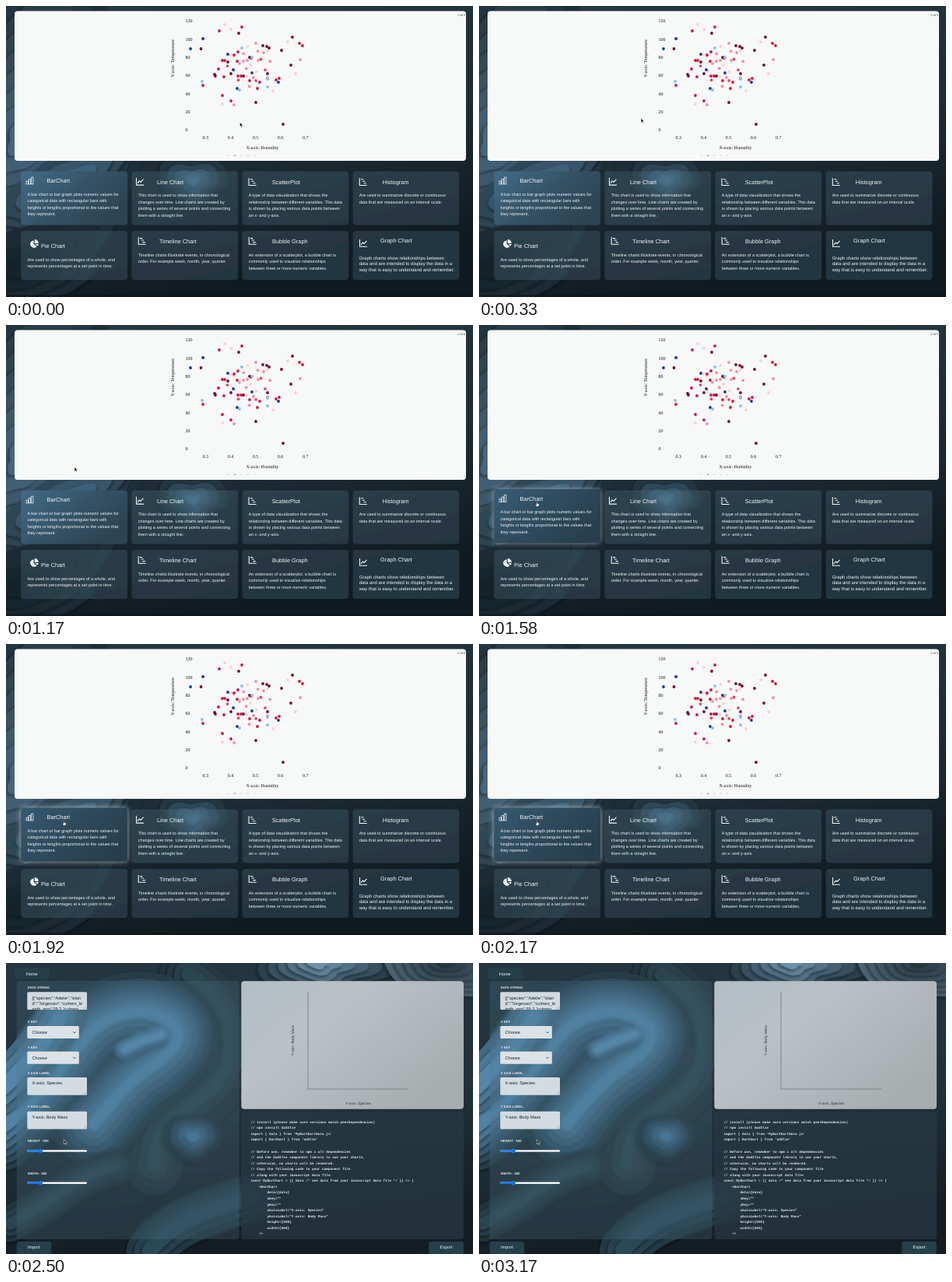
Write an HTML page that moves like this. It is 600 px wide and 374 px high and loops after 3.33 s.

```html
<!DOCTYPE html>
<html lang="en">
<head>
<meta charset="utf-8">
<style>
html, body { margin: 0; width: 100%; height: 100%; overflow: hidden; background: #16232b; }
svg { display: block; width: 100vw; height: 100vh; }
text { font-family: "Liberation Sans", Arial, sans-serif; white-space: pre; text-rendering: geometricPrecision; }
.serif { font-family: "Liberation Serif", Times, serif; font-size: 6px; fill: #111; }
.mono { font-family: "Liberation Mono", "Courier New", monospace; font-size: 4.36px; font-weight: bold; fill: #e6ebee; }
.title { font-size: 7.4px; fill: #f2f6f8; }
.body { font-size: 5.48px; fill: #f2f6f8; }
.label { font-size: 4.25px; font-weight: bold; fill: #e3eaee; }
.field { font-size: 5.6px; fill: #17222a; }
.button { font-size: 5.6px; fill: #f2f6f8; text-anchor: middle; }
.axis { font-size: 4.8px; fill: #33393d; text-anchor: middle; }
.icon { fill: none; stroke: #f2f6f8; stroke-width: 1.1; stroke-linejoin: round; }
.ridge { fill: none; stroke-linecap: round; stroke-linejoin: round; }
</style>
</head>
<body>
<svg id="stage" viewBox="0 0 600 374" preserveAspectRatio="none"></svg>
<script>
const stage = document.getElementById('stage');
const TAU = Math.PI * 2;

const text = (x, y, cls, str, extra = '') =>
  `<text x="${x}" y="${y}" class="${cls}" ${extra}>${str.replace(/&/g, '&amp;').replace(/</g, '&lt;')}</text>`;
const rect = (x, y, w, h, fill, r = 0, extra = '') =>
  `<rect x="${x}" y="${y}" width="${w}" height="${h}" rx="${r}" fill="${fill}" ${extra}/>`;
const lines = (x, y, step, cls, rows, extra) =>
  rows.map((row, i) => text(x, y + i * step, cls, row, extra)).join('');
const blend = (from, to, k, steps) =>
  `color-mix(in srgb, ${to} ${Math.round(100 * k / Math.max(1, steps - 1))}%, ${from})`;

// Wavy paper-cut terraces, each one a smaller ring on top of the last.
function terraces({ x, y, rx, ry, tilt = 0, steps, from, to, wave = 0.12, seed = 0 }) {
  let out = '';
  for (let k = 0; k < steps; k++) {
    const size = 1 - k / steps;
    const points = Array.from({ length: 60 }, (_, i) => {
      const a = i / 60 * TAU;
      const r = size * (1 + wave * Math.sin(3 * a + seed + k * 0.2) + wave * 0.6 * Math.sin(5 * a - seed * 2));
      return `${(Math.cos(a) * r * rx).toFixed(1)},${(Math.sin(a) * r * ry).toFixed(1)}`;
    });
    out += `<polygon points="${points.join(' ')}" transform="translate(${x} ${y}) rotate(${tilt})"
      style="fill:${blend(from, to, k, steps)}" filter="url(#lift)"/>`;
  }
  return out;
}

// The same paper-cut look along a curved spine: ever narrower strokes.
const ridge = (d, width, steps, from, to) => Array.from({ length: steps }, (_, k) =>
  `<path class="ridge" d="${d}" stroke-width="${width * (1 - k / steps)}"
    style="stroke:${blend(from, to, k, steps)}" filter="url(#lift)"/>`).join('');

const defs = `<defs>
  <filter id="lift" filterUnits="userSpaceOnUse" x="-250" y="-250" width="1100" height="900">
    <feDropShadow dx="-1" dy="2" stdDeviation="2" flood-color="#060d12" flood-opacity=".6"/></filter>
  <filter id="frost" filterUnits="userSpaceOnUse" x="-20" y="-20" width="640" height="414"><feGaussianBlur stdDeviation="2.4"/></filter>
  <filter id="glow" x="-30%" y="-40%" width="160%" height="180%"><feGaussianBlur stdDeviation="3.5"/></filter>
  <linearGradient id="night" x2=".35" y2="1"><stop stop-color="#273943"/><stop offset=".6" stop-color="#1d2c35"/><stop offset="1" stop-color="#101a21"/></linearGradient>
  <linearGradient id="deep" x2=".2" y2="1"><stop stop-color="#243640"/><stop offset=".6" stop-color="#20313a"/><stop offset="1" stop-color="#141d23"/></linearGradient>
  <linearGradient id="first" x2="1" y2=".6"><stop stop-color="#426b86"/><stop offset=".55" stop-color="#355366"/><stop offset="1" stop-color="#2d4452"/></linearGradient>
  <linearGradient id="silver" x2="1" y2=".7"><stop stop-color="#b3bec5"/><stop offset=".4" stop-color="#bac1c5"/><stop offset="1" stop-color="#a7acaf"/></linearGradient>
</defs>`;

// Chart overview
const dots = {
  '#fbcfd1': [281, 24, 255, 42, 289, 30, 362, 46, 289, 63, 372, 87, 278, 126, 343, 109],
  '#f48fa0': [321, 48, 331, 60, 293, 127, 378, 69, 305, 71, 310, 70, 324, 70, 318, 92],
  '#cf1740': [274, 32, 303, 27, 377, 48, 381, 51, 278, 70, 281, 70, 273, 81, 280, 91, 253, 102, 298, 59,
    293, 63, 297, 71, 298, 90, 302, 90, 323, 106, 326, 98, 313, 96, 351, 93, 347, 95, 278, 115, 289, 122],
  '#750a2a': [299, 35, 250.5, 55, 330, 51, 335, 52, 368, 40, 354, 57, 285, 72, 268, 88, 269, 90, 289, 87,
    313, 66, 338, 54, 366, 76, 336, 87, 321, 124, 356, 152, 305, 90],
  '#123a94': [237, 55, 253, 42, 285, 62, 292, 82, 350, 98, 297, 106, 316, 86],
  '#83bdf0': [252, 97, 303, 54, 316, 66, 300, 108, 336, 104, 336, 94]
};
const dot = (x, y, fill) => `<circle cx="${x}" cy="${y}" r="1.9" fill="${fill}"/>`;

function scatter() {
  let out = '';
  const tints = ['#fbcfd1', '#f48fa0', '#e0476a'];
  for (let i = 0; i < 20; i++) {
    const a = i * 2.4, r = Math.sqrt(i / 20);
    out += dot(314 + 32 * r * Math.cos(a), 76 + 28 * r * Math.sin(a), tints[i % 3]);
  }
  for (const [fill, xy] of Object.entries(dots))
    for (let i = 0; i < xy.length; i += 2) out += dot(xy[i], xy[i + 1], fill);
  for (let i = 0; i <= 6; i++) out += text(230.5, 161.4 - i * 23.35, 'serif', String(i * 20));
  for (let i = 0; i < 5; i++) {
    out += text(256.3 + i * 32.1, 171.2, 'serif', `0.${i + 3}`, 'text-anchor="middle"');
    out += `<path d="M${284 + i * 8.4} 193h2.4v-2.4z" fill="${i === 1 ? '#999' : '#d6d9da'}"/>`;
  }
  return out + text(329.5, 183.6, 'serif', 'X-axis: Humidity', 'text-anchor="middle"')
    + text(0, 0, 'serif', 'Y-axis: Temperature', 'text-anchor="middle" transform="translate(216.3 67.5) rotate(-90)"')
    + text(590, 12.5, 'axis', '2 of 5', 'style="font-size:3.8px;text-anchor:end"');
}

const icons = {
  bars: '<path class="icon" d="M.5 9.5V5.5H3V9.5ZM3.7 9.5V3H6.2V9.5ZM6.9 9.5V.5H9.4V9.5Z" style="stroke-width:.8"/>',
  line: '<path class="icon" d="M.5 0V9.3H10M2 6.8L4.3 4L6 5.5L9.5 1.8"/>',
  plot: '<path class="icon" d="M.5 0V9.3H10M2.3 1.6H5.5M4 4H7.3M5.8 6.6H9"/>',
  pie: '<path fill="#f2f6f8" d="M4.8 1.2A4.8 4.8 0 1 0 8.7 9.2L4.8 6ZM6 0V5H11A5 5 0 0 0 6 0ZM6.5 6L9.6 8.6A5 5 0 0 0 11 6Z"/>'
};
const cards = [
  { icon: ['bars', 25.5, 219.5], title: ['BarChart', 52.5, 227.3], at: [27.5, 243.9], rows: [
    'A bar chart or bar graph plots numeric values for', 'categorical data with rectangular bars with',
    'heights or lengths proportional to the values that', 'they represent.'] },
  { icon: ['line', 167, 220.8], title: ['Line Chart', 194, 229], at: [169.7, 245.3], rows: [
    'This chart is used to show information that', 'changes over time. Line charts are created by',
    'plotting a series of several points and connecting', 'them with a striaght line.'] },
  { icon: ['plot', 311.5, 221.2], title: ['ScatterPlot', 341.7, 229], at: [311.7, 245.3], rows: [
    'A type of data visualization that shows the', 'relationship between different variables. This data',
    'is shown by placing various data points between', 'an x- and y-axis.'] },
  { icon: ['plot', 453.8, 221.2], title: ['Histogram', 483.8, 229], at: [453.7, 245.3], rows: [
    'Are used to summarize discrete or continuous', 'data that are measured on an interval scale.'] },
  { icon: ['pie', 30.8, 300], title: ['Pie Chart', 45, 310.8], at: [27.5, 328], rows: [
    'Are used to show percentages of a whole, and', 'represents percentages at a set point in time.'] },
  { icon: ['plot', 169.7, 297], title: ['Timeline Chart', 197, 304.6], at: [169.7, 322], rows: [
    'Timeline charts illustrate events, in chronological', 'order. For example week, month, year, quarter.'] },
  { icon: ['plot', 311.7, 297], title: ['Bubble Graph', 342, 304.6], at: [311.7, 322], rows: [
    'An extension of a scatterplot, a bubble chart is', 'commonly used to visualize relationships', 'between three or more numeric variables.'] },
  { icon: ['line', 454, 300], title: ['Graph Chart', 481, 304.4], at: [453.7, 325.8], size: 5.97, step: 7.6, rows: [
    'Graph charts show relationships between', 'data and are intended to display the data in a', 'way that is easy to understand and remember.'] }
];
const cardRect = (i, fill, extra) =>
  rect(19.3 + (i % 4) * 142.1, i < 4 ? 212.5 : 289, 136.7, i < 4 ? 69 : 63, fill, 4, extra);

function card(c, i) {
  const [icon, ix, iy] = c.icon, [title, tx, ty] = c.title;
  const content = `<g transform="translate(${ix} ${iy})">${icons[icon]}</g>` + text(tx, ty, 'title', title)
    + lines(...c.at, c.step || 8.4, 'body', c.rows, c.size ? `style="font-size:${c.size}px"` : '');
  if (i) return content;
  return `<g id="hovered"><g id="halo" opacity="0">${cardRect(0, '#dce3e6', 'filter="url(#glow)"')}</g>
    ${cardRect(0, 'url(#first)')}<g id="shade" opacity="0">${cardRect(0, '#1d3240')}</g>${content}</g>`;
}

const overviewLand = rect(0, 0, 600, 374, 'url(#night)')
  + terraces({ x: 20, y: 170, rx: 150, ry: 210, tilt: 25, steps: 9, from: '#1f2f39', to: '#46667d', seed: 1 })
  + terraces({ x: 75, y: 235, rx: 85, ry: 42, tilt: -32, steps: 4, from: '#2f4657', to: '#46718e', seed: 2 })
  + terraces({ x: 240, y: 224, rx: 44, ry: 30, steps: 4, from: '#22343f', to: '#426a84', seed: 3 })
  + terraces({ x: 20, y: 335, rx: 110, ry: 52, tilt: -18, steps: 4, from: '#1c2c35', to: '#16232b', seed: 4 });

const overview = `<g id="overview"><g id="land">${overviewLand}</g>
  <clipPath id="cardClip">${cards.map((_, i) => i ? cardRect(i, '#fff') : '').join('')}</clipPath>
  <g clip-path="url(#cardClip)"><use href="#land" filter="url(#frost)"/>${rect(0, 0, 600, 374, '#5b8399', 0, 'opacity=".25"')}</g>
  ${rect(0, 371, 600, 3, '#0c151b', 0, 'opacity=".6"')}
  ${rect(11, 6.5, 580, 192.5, '#f7f8f8', 4)}${scatter()}${cards.map(card).join('')}</g>`;

// Chart editor
const arch = 'M-10 215C30 185 60 150 95 105C120 70 165 52 205 72C240 92 210 118 185 135C158 152 140 175 112 208';
const editorLand = rect(0, 0, 600, 374, 'url(#deep)')
  + ridge('M235 15C300 55 300 130 262 165C225 195 190 205 190 260', 75, 4, '#22343d', '#2c444f')
  + ridge(arch, 105, 6, '#263d4a', '#4f83a6')
  + ridge('M-10 165C20 140 45 110 70 70', 60, 3, '#436b84', '#5286aa')
  + ridge('M152 112C172 100 185 98 200 92', 24, 2, '#47769a', '#568db2')
  + ridge('M5 335C60 310 85 275 140 262', 46, 3, '#22343e', '#2b4451')
  + terraces({ x: 240, y: 223, rx: 38, ry: 30, steps: 4, from: '#22363f', to: '#44769a', seed: 3, wave: 0.06 })
  + ridge('M185 370C215 330 260 320 320 300', 60, 3, '#243842', '#2c4857')
  + terraces({ x: 400, y: 0, rx: 88, ry: 40, tilt: 6, steps: 6, from: '#2b404c', to: '#6d91ab', seed: 2.4 })
  + terraces({ x: 565, y: -4, rx: 85, ry: 48, tilt: 12, steps: 7, from: '#4c6373', to: '#2a3b45', seed: 1, wave: 0.06 });

const field = (y, h, rows) => rect(27.3, y, 76.7, h, '#dce2e6', 1.5, 'fill-opacity=".95"')
  + `<clipPath id="clip${y}">${rect(27, y, 77, h)}</clipPath><g clip-path="url(#clip${y})">${lines(33.5, y + 9.4, 7, 'field', rows)}</g>`
  + `<path d="M100 ${y + h - 1}l3-3M101.7 ${y + h - 1}l1.3-1.3" stroke="#7b858b" stroke-width=".5"/>`;
const select = y => rect(27.3, y, 66.5, 16, '#dce2e6', 1.5) + text(33.5, y + 10, 'field', 'Choose')
  + `<path d="M86.3 ${y + 7.3}l1.7 1.7l1.7-1.7" fill="none" stroke="#26323a" stroke-width=".8"/>`;
const slider = y => rect(27.3, y - 1.3, 76.7, 2.6, '#eff1f2', 1.3) + rect(27.3, y - 1.3, 17, 2.6, '#1277f0', 1.3)
  + `<circle cx="44.3" cy="${y}" r="2.7" fill="#1277f0"/>`;
const button = (x, y, w, h, label) => rect(x, y, w, h, '#25404b', 3) + text(x + w / 2, y + 9.2, 'button', label);

const labels = { 'DATA STRING': 32.7, 'X KEY': 77, 'Y KEY': 109.6, 'X AXIS LABEL': 142.6,
  'Y AXIS LABEL': 186, 'HEIGHT - 500': 230.4, 'WIDTH - 500': 271.6 };
const code = [
  '// install (please make sure versions match peerDependencies)', '// npm install @ad3lie',
  "import { data } from 'MyBarChartData.js'", "import { BarChart } from 'ad3lie'", '',
  '// Before use, remember to npm i all dependencies', '// and the @ad3lie component library to use your charts,',
  '// otherwise, no charts will be rendered.', '// Copy the following code to your component file',
  '// along with your Javascript data file.',
  'const MyBarChart = ({ data /* see data from your Javascript data file */ }) => (',
  '    <BarChart', '        data={data}', '        xKey=""', '        yKey=""',
  '        xAxisLabel="X-axis: Species"', '        yAxisLabel="Y-axis: Body Mass"',
  '        height={500}', '        width={500}', '    />'
];

const editor = `<g id="editor"><g id="editorLand">${editorLand}</g>
  <clipPath id="panelClip">${rect(13.7, 23, 286, 332, '#fff', 4)}${rect(302.3, 191, 285.7, 164, '#fff', 4)}</clipPath>
  <g clip-path="url(#panelClip)"><use href="#editorLand" filter="url(#frost)"/>${rect(0, 0, 600, 374, '#55798c', 0, 'opacity=".25"')}
  ${rect(302, 191, 286, 164, '#22323b', 0, 'opacity=".65"')}</g>
  ${rect(302.3, 23.3, 285.7, 164.4, 'url(#silver)', 4)}
  <path d="M388 37V162H517" fill="none" stroke="#6b7175" stroke-width=".7"/>
  ${text(452.5, 182, 'axis', 'X-axis: Species')}
  ${text(0, 0, 'axis', 'Y-axis: Body Mass', 'transform="translate(369.6 99.5) rotate(-90)"')}
  ${lines(314.5, 205.8, 7.55, 'mono', code)}
  ${Object.entries(labels).map(([name, y]) => text(27.7, y, 'label', name)).join('')}
  ${field(37.3, 22.7, ['[{"species":"Adelie","islan', 'd":"Torgersen","culmen_le', 'ngth_mm":39.2,"culmen_'])}
  ${select(81)}${select(113.7)}
  ${field(147, 22.7, ['X-axis: Species'])}${field(190.7, 22.7, ['Y-axis: Body Mass'])}
  ${slider(241.5)}${slider(282.7)}
  ${button(11, 6.5, 44.5, 13.5, 'Home')}${button(13.7, 358, 44.5, 18, 'Import')}${button(543.3, 358, 44.5, 18, 'Export')}</g>`;

const pointer = `<g id="pointer">
  <path id="arrow" d="M0 0V5.6L1.3 4.5L2.2 6.5L3.2 6L2.3 4.1H4Z" fill="#111" stroke="#fff" stroke-width=".5"/>
  <path id="hand" d="M-.5 0Q.2-.5.5.2V2.2L2.6 2.8Q3.2 3.2 2.9 4.3L2.3 6.2H-.5L-2 3.8Q-1.5 3-.5 3.9Z" fill="#fff" stroke="#111" stroke-width=".5"/></g>`;

stage.innerHTML = defs + overview + editor + pointer;
const el = Object.fromEntries(['overview', 'editor', 'hovered', 'halo', 'shade', 'pointer', 'arrow', 'hand']
  .map(id => [id, document.getElementById(id)]));

const LOOP = 3330, STEP = 1000 / 12, CUT = 2500, HOVER = 1410, PRESS = 2330;
const path = [[0, 300.5, 149.5], [600, 142, 140.5], [670, 142, 140.5], [1170, 88, 182.5], [1580, 74.3, 227]];
const ease = p => p * p * (3 - 2 * p);
const clamp = p => Math.min(1, Math.max(0, p));

function pointerAt(t) {
  const i = path.findIndex(([time]) => time > t);
  if (i < 0) return path[path.length - 1].slice(1);
  const [t0, x0, y0] = path[i - 1], [t1, x1, y1] = path[i];
  const p = ease((t - t0) / (t1 - t0));
  return [x0 + (x1 - x0) * p, y0 + (y1 - y0) * p];
}

const show = (node, on) => node.setAttribute('display', on ? 'inline' : 'none');
let last = -1;

function draw(ms) {
  const frame = Math.min(38, Math.floor((ms % LOOP + 4) / STEP));
  if (frame === last) return;
  last = frame;
  const t = frame * STEP + 0.01;
  const hover = ease(clamp((t - HOVER) / 250));
  const onCard = t >= HOVER && t < PRESS;
  const [x, y] = pointerAt(t);
  show(el.overview, t < CUT);
  show(el.editor, t >= CUT);
  show(el.arrow, !onCard);
  show(el.hand, onCard);
  el.hovered.setAttribute('transform', `translate(0 ${-2 * hover})`);
  el.halo.setAttribute('opacity', 0.75 * hover);
  el.shade.setAttribute('opacity', 0.3 * hover);
  el.pointer.setAttribute('transform', `translate(${x} ${y})`);
}

const start = performance.now();
function tick() {
  draw(performance.now() - start);
  requestAnimationFrame(tick);
}
tick();
</script>
</body>
</html>
```
